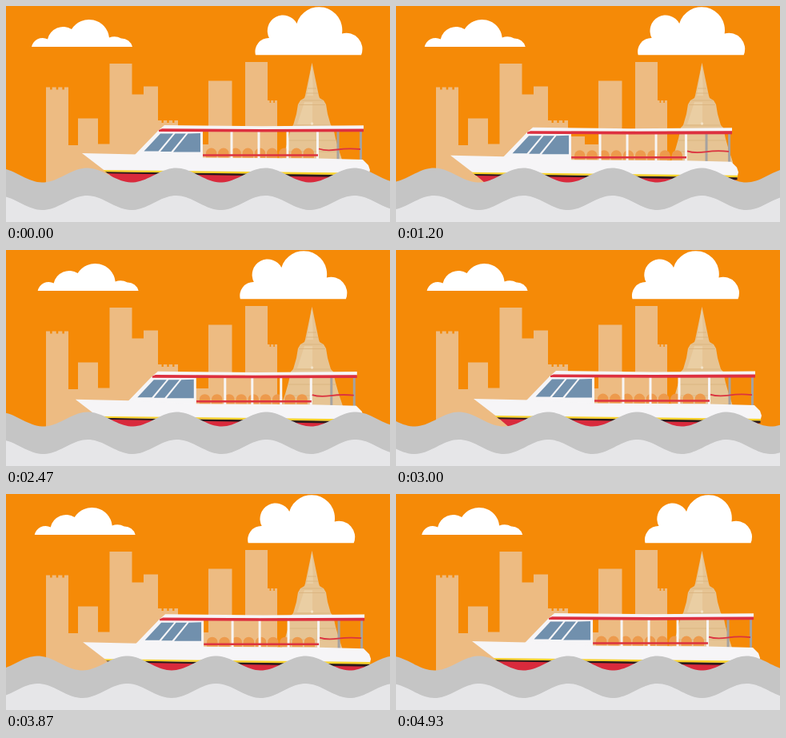
These frames come from a looping animation (480 by 270 pixels, 4.99 s). An HTML page:

```html
<!DOCTYPE html>
<html lang="en">
<head>
<meta charset="utf-8">
<title>River boat</title>
<style>
  html, body { margin: 0; width: 100%; height: 100%; overflow: hidden; background: #f58a07; }
  svg { display: block; width: 100vw; height: 100vh; }
</style>
</head>
<body>
<svg viewBox="0 0 480 270" preserveAspectRatio="none">
  <rect width="480" height="270" fill="#f58a07"/>

  <g fill="#fff">
    <path id="smallCloud" d="M32 51A14 14 0 0 1 52 41.500A20 20 0 0 1 82 29A25.500 25.500 0 0 1 129 39.500A18 18 0 0 1 144 40.500A14 14 0 0 1 158 51Z"/>
    <path id="bigCloud" d="M312 61.300A17 17 0 0 1 329 40A19 19 0 0 1 363.500 22A29 29 0 0 1 420 34.500A20 20 0 0 1 444 61.300Z"/>
  </g>

  <path id="skyline" fill="#edbb82"/>

  <g id="temple">
    <path fill="#e6c494" d="M382.500 71L374 112L373 115L368 118L365 123L363 135L359 149L356 152L353 166L349 180L344 195V222H421V195L416 180L412 166L409 152L406 149L402 135L400 123L397 118L392 115L391 112Z"/>
    <path fill="#eaceA3" d="M382.500 71L376 112H384ZM373 120L364 148H383V120Z"/>
    <path fill="none" stroke="#d9b27d" stroke-width=".8" d="M377 103H388M375 109H390M369 118H396M366 123.500H399M360 149H405M355 156H410M352 168H413M348 182H417"/>
    <circle cx="382.500" cy="147" r="1.700" fill="#f3e3c6"/>
  </g>

  <g id="boat">
    <g id="seats" fill="#ed9a4c"></g>
    <g fill="none" stroke="#f7f5f4" stroke-width="3">
      <path d="M282 154V192M316 154V192M352 154V192M389.500 154V192"/>
      <path stroke="#a5a2a0" d="M415 156V194M443.500 156V194"/>
      <path stroke="#dc3340" stroke-width="2.500" d="M246 186.500H390"/>
      <path stroke="#dc3340" stroke-width="1.800" d="M391 178.500Q400 181.500 414 179.500T443 179"/>
    </g>
    <path fill="#f6f5f7" d="M198 149L320 150.300L447 149.300V154H246V192H155L163 184L190 156Z"/>
    <path fill="#dd3040" d="M191 155L195 153.300L320 154L447 153.500V157.300L320 157.600L191 157Z"/>
    <path fill="#7190ad" d="M193 159.500H209L190.500 181.500H172.500ZM211.500 159.500H225L206.500 182H193ZM227.500 159.500L243 159V182.500H209Z"/>
    <path fill="#f6f5f7" d="M95 184L163 185.500L246 189.500L390 190.500L446 192L453 199L455 205L453 213L125 207Z"/>
    <path fill="#d92a3c" d="M126 208L452 213L447 226H147Z"/>
    <path fill="#2b1a1c" d="M124 207L453.500 211V214.500L127 209.200Z"/>
    <path fill="#f8d22b" d="M121.500 205L454.500 208.800L453.500 211.500L124.500 207.200Z"/>
  </g>

  <path id="water" fill="#e6e6e8" d="M0 232H480V270H0Z"/>
  <path id="wave" fill="#c5c5c5"/>
</svg>
<script>
const LOOP = 4990;
const WAVELENGTH = 111.5;
const byId = id => document.getElementById(id);

// Piecewise linear track of [time, value] stops.
function track(t, stops) {
  const i = Math.max(1, stops.findIndex(([time]) => time >= t));
  const [t0, v0] = stops[i - 1], [t1, v1] = stops[i];
  return v0 + (v1 - v0) * (t - t0) / (t1 - t0);
}

const block = (left, right, top) => `M${left} ${top}H${right}V222H${left}Z`;

// Teeth are twice as wide as the gaps between them.
function battlement(left, right, top, teeth) {
  const gap = (right - left) / (teeth * 3 - 1);
  let path = block(left, right, top);
  for (let i = 0; i < teeth; i++) {
    path += `M${left + i * 3 * gap} ${top + .5}v-3.500h${gap * 2}v3.500Z`;
  }
  return path;
}

// Band of even thickness whose two edges share one phase.
function waveBand(top, bottom, trough) {
  const upper = [], lower = [];
  for (let x = 0; x <= 480; x += 3) {
    const swell = 9 * Math.cos((x - trough) / WAVELENGTH * 2 * Math.PI);
    upper.push(`${x} ${(top + swell).toFixed(2)}`);
    lower.unshift(`${x} ${(bottom + swell).toFixed(2)}`);
  }
  return `M${upper.concat(lower).join('L')}Z`;
}

byId('skyline').setAttribute('d', [
  battlement(50, 78, 104.5, 4),
  block(77.5, 90.5, 174), block(90, 115, 140.5), block(114.5, 130.5, 172.5),
  block(129.5, 157.5, 72), block(157, 172.5, 110.5), block(172, 190, 100.5),
  battlement(190, 215, 146, 4),
  block(214.5, 236, 163), block(235.5, 254, 173),
  block(253, 282.5, 93.5), block(282, 299.5, 157), block(299, 327, 70),
  battlement(326.5, 339, 121, 3)
].join(''));

byId('seats').innerHTML = Array.from({ length: 9 }, (_, i) => {
  const x = 250 + i * 15.2;
  return `<path d="M${x} 190V184a6.700 6.500 0 0 1 13.400 0V190Z"/>`;
}).join('');

const move = (id, x, y = 0) => byId(id).setAttribute('transform', `translate(${x} ${y})`);

function draw(t) {
  const drift = track(t, [[0, 0], [2580, 1], [LOOP, 0]]);
  move('smallCloud', 8 * drift);
  move('bigCloud', -20 * drift);
  move('boat',
    track(t, [[0, 0], [1350, -30.3], [2990, 2], [LOOP, 0]]),
    track(t, [[0, 0], [1350, 3.2], [1930, 3.2], [LOOP, 0]]));
  byId('wave').setAttribute('d', waveBand(211.5, 246, 157 - 2 * WAVELENGTH * t / LOOP));
}

const start = performance.now();
function tick() {
  draw((performance.now() - start) % LOOP);
  requestAnimationFrame(tick);
}
tick();
</script>
</body>
</html>
```
